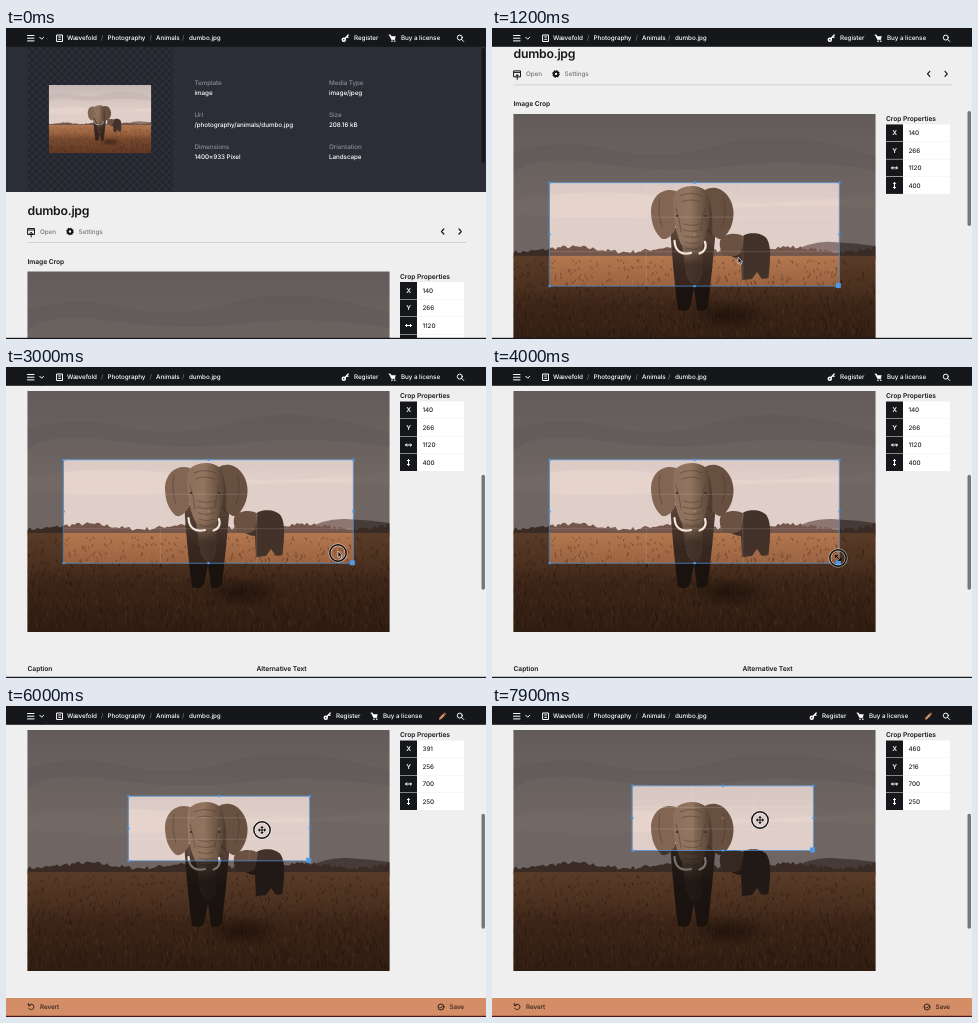
Animation of 480 by 311 pixels, one loop 8000 ms. Source, as an HTML page:

```html
<!DOCTYPE html>
<html lang="en">
<head>
<meta charset="utf-8">
<title>Image crop</title>
<style>
  html, body { margin: 0; width: 100%; height: 100%; overflow: hidden; background: #efefef; }
  svg { display: block; width: 100vw; height: 100vh; }
  text { font: 500 6.3px Inter, Roboto, sans-serif; letter-spacing: -.01em; text-rendering: geometricPrecision; }
  .bold { font-weight: 600; font-size: 6.7px; }
  .line { fill: none; stroke-linecap: round; stroke-linejoin: round; }
</style>
</head>
<body>
<svg id="stage" viewBox="0 0 480 311" xmlns="http://www.w3.org/2000/svg">
  <defs>
    <linearGradient id="sky" x1="0" y1="0" x2="0" y2="1">
      <stop offset="0" stop-color="#c5b8b4"/><stop offset=".6" stop-color="#e0cec8"/>
    </linearGradient>
    <linearGradient id="grass" x1="0" y1="0" x2="0" y2="1">
      <stop offset="0" stop-color="#b37850"/><stop offset=".3" stop-color="#9a6240"/>
      <stop offset=".5" stop-color="#784a2f"/><stop offset="1" stop-color="#5e3823"/>
    </linearGradient>
    <linearGradient id="legs" x1="0" y1="0" x2="0" y2="1">
      <stop offset="0" stop-color="#5d4639"/><stop offset=".5" stop-color="#362720"/><stop offset="1" stop-color="#35241a"/>
    </linearGradient>
    <linearGradient id="skin" x1="0" y1="0" x2="1" y2="0">
      <stop offset="0" stop-color="#8c705d"/><stop offset=".45" stop-color="#92755f"/><stop offset="1" stop-color="#584436"/>
    </linearGradient>
    <linearGradient id="trunk" x1="0" y1="0" x2="0" y2="1">
      <stop offset="0" stop-color="#31231c" stop-opacity="0"/><stop offset=".55" stop-color="#31231c" stop-opacity=".8"/>
    </linearGradient>
    <radialGradient id="shadow">
      <stop offset="0" stop-color="#1c100a" stop-opacity=".55"/><stop offset="1" stop-color="#1c100a" stop-opacity="0"/>
    </radialGradient>
    <pattern id="check" width="7.2" height="7.2" patternUnits="userSpaceOnUse" x="21.5" y="19">
      <path d="M0 0h3.6v7.2h3.6v-3.6H0z" fill="#22252b"/>
    </pattern>
    <clipPath id="frame"><rect x="21.5" y="24" width="362" height="241"/></clipPath>
    <g id="photo" clip-path="url(#frame)">
      <rect x="21" y="24" width="363" height="145" fill="url(#sky)"/>
      <path d="M21 62Q70 48 120 60T230 54 384 66V80Q300 68 240 76T110 74 21 84z" fill="#b3a5a2" opacity=".3"/>
      <path d="M21 110Q100 96 180 108T384 104V118Q280 112 200 122T21 124z" fill="#eadad3" opacity=".4"/>
      <path d="M296 164Q318 151 340 152T384 156V170H296z" fill="#8d7671"/>
      <path id="trees" fill="#74574a"/>
      <rect x="21" y="166" width="363" height="100" fill="url(#grass)"/>
      <path id="blades" class="line" stroke="#3d2113" stroke-width=".8" opacity=".5"/>
      <path id="straw" class="line" stroke="#c98d5f" stroke-width=".6" opacity=".35"/>
      <ellipse cx="236" cy="225" rx="42" ry="16" fill="url(#shadow)"/>
      <path d="M247 149C254 141 270 142 275 149 280 158 278 172 276.500 188L270 189 265 182 260 189 250 190 249 169C243 169 239 165 235 165z" fill="#43322a"/>
      <path d="M228 151C231 143 246 142 252 147L249 163C243 168 236 165 232 166 229 162 227 157 228 151z" fill="#6a5142"/>
      <path d="M178 138L181 175 184 205 186 220Q194 223 198 218L202 198 205 220Q212 223 216 217L220 180 224 138z" fill="url(#legs)"/>
      <path d="M184 101C172 97 160 105 159 120 159 130 161 140 168 147 172 152 178 148 183 140z" fill="#826653"/>
      <path d="M213 100C226 93 240 104 241.500 122 242 135 236 143 231 149 225 151 220 144 215 136z" fill="#685040"/>
      <path d="M214 101Q222 118 220 146L213 140z" fill="#3f2f26" opacity=".6"/>
      <path id="head" d="M182 104C188 95 206 93 214 101 219 110 219 128 215 140L211 156C210 176 211 186 206 193 201 197 195 190 194 180L190 156C184 145 179 122 182 104z" fill="url(#skin)"/>
      <path d="M189 152H212C210 176 211 186 206 193 201 197 195 190 194 180z" fill="url(#trunk)"/>
      <path class="line" d="M192 134q8 3 16 0M191 140q9 3 18 0M192 146q8 3 16 0M193 152q8 3 15 0M194 158q7 3 13 0M188 106q11-5 22 0M190 112q9-4 18 0M168 108q-3 14 2 29M231 108q5 12-1 29M184 118q4 12 5 24M213 118q-3 12-4 22" stroke="#43312a" stroke-width=".8" opacity=".55"/>
      <circle cx="185" cy="126" r="1" fill="#2d201a"/><circle cx="213.500" cy="126" r="1" fill="#2d201a"/>
      <path class="line" d="M182.500 151C183 161 189 165.500 199 163M213 152C215 158 212 162.500 207.500 163.500" stroke="#f1e5d8" stroke-width="2.200"/>
    </g>
  </defs>

  <rect width="480" height="311" fill="#efefef"/>
  <g id="page">
    <rect y="0" width="480" height="164" fill="#2b2e36"/>
    <rect x="21.500" y="19" width="145.500" height="145" fill="url(#check)"/>
    <use href="#photo" transform="translate(42.800 57) scale(.283) translate(-21.500 -24)"/>
    <g id="info"></g>
    <text x="21.500" y="187.400" fill="#16171a" style="font-size:12.3px;font-weight:600;letter-spacing:-.02em">dumbo.jpg</text>
    <g class="line" stroke="#16171a" stroke-width="1">
      <path d="M22 200.500h6.500v6H22zM22 202h6.500M25.200 209v-4.500M23.700 205.700l1.500-1.500 1.500 1.500"/>
      <circle cx="64" cy="203.500" r="2.200" stroke-width="2"/>
      <circle cx="64" cy="203.500" r="3.200" stroke-width="1.200" stroke-dasharray="1.250" stroke-linecap="butt"/>
      <path d="M437.800 201l-2.300 2.500 2.300 2.500M453 201l2.300 2.500-2.300 2.500" stroke-width="1.200"/>
    </g>
    <text x="34" y="205.800" fill="#777">Open</text>
    <text x="72.500" y="205.800" fill="#777">Settings</text>
    <path d="M21.500 214.500H460" stroke="#d2d2d2"/>
    <text class="bold" x="21.500" y="236" fill="#16171a">Image Crop</text>
    <text class="bold" x="394" y="250.700" fill="#16171a">Crop Properties</text>
    <g id="fields"></g>
    <g transform="translate(0 219.500)">
      <use href="#photo"/>
      <path id="shade" fill="#000" fill-opacity=".5" fill-rule="evenodd"/>
      <path id="thirds" class="line" stroke="#eee" stroke-width=".4" stroke-dasharray="1 1" opacity=".4"/>
      <path id="edge" class="line" stroke="#4f98e0" stroke-width=".8" opacity=".9"/>
      <path id="grips" fill="#4f9ae8"/>
    </g>
    <text class="bold" x="21.500" y="523" fill="#16171a">Caption</text>
    <text class="bold" x="250.500" y="523" fill="#16171a">Alternative Text</text>
  </g>

  <rect id="thumb" x="475.500" width="3.500" height="115" rx="1.700" fill="#000" fill-opacity=".5"/>
  <rect width="480" height="18.800" fill="#15171a"/>
  <g class="line" stroke="#fff" stroke-width="1">
    <path d="M21.500 7.500H28M21.500 10.200H28M21.500 12.900H28M33.800 9.300l1.900 1.900 1.900-1.900"/>
    <path d="M51 7h5.500v6.500H51zM52.700 9h2M52.700 11.300h2"/>
    <circle cx="453.800" cy="9.600" r="2.500"/><path d="M455.700 11.500l2 2"/>
  </g>
  <g id="crumbs"></g>
  <g id="menu">
    <circle cx="337.800" cy="11.700" r="1.500" class="line" stroke="#fff" stroke-width="1.500"/>
    <path class="line" d="M339 10.500l3.200-3.500M341 8.300l1 1" stroke="#fff" stroke-width="1.300"/>
    <path d="M383 7h1.500l.5 1.200h4.800l-1 3.200h-3.500z" fill="#fff"/>
    <path class="line" d="M383 7h1.500l1.300 4.700h3" stroke="#fff" stroke-width=".8"/>
    <circle cx="386" cy="13.200" r=".8" fill="#fff"/><circle cx="388.800" cy="13.200" r=".8" fill="#fff"/>
    <text x="348" y="12.400" fill="#fff">Register</text>
    <text x="395" y="12.400" fill="#fff">Buy a license</text>
  </g>
  <path id="pencil" d="M433 13.700l.4-2 4-4.200 1.700 1.700-4.100 4.100zM437.900 7l.7-.6 1.600 1.600-.6.700z" fill="#dc9069"/>

  <g id="bar">
    <rect y="292" width="480" height="19" fill="#d38d67"/>
    <g class="line" stroke="#33231b" stroke-width="1">
      <path d="M22.800 299.300a2.800 2.800 0 1 1-.2 2.800M22.300 297.600v2h2"/>
      <circle cx="435" cy="301" r="3"/><path d="M433.600 301l1.100 1.100 1.900-2"/>
    </g>
    <text x="34" y="303.300" fill="#33231b">Revert</text>
    <text x="443.500" y="303.300" fill="#33231b">Save</text>
  </g>
  <rect id="base" y="309.800" width="480" height="1.200"/>

  <g id="cursor">
    <g id="ring" class="line">
      <circle r="8.200" stroke="#fff" stroke-opacity=".5" stroke-width="3"/>
      <circle r="8.200" stroke="#0c0c0c" stroke-width="1.400"/>
    </g>
    <path id="arrow" d="M0-2V4.500L1.500 3.200 2.500 5.500 3.700 5 2.700 2.800H4.500z" fill="#111" stroke="#fff" stroke-width=".6"/>
    <path id="slant" class="line" d="M-2.500-2.500l5 5M-2.500-.5v-2h2M2.500.5v2h-2" stroke="#111"/>
    <g id="cross" class="line">
      <path d="M-3.200 0H3.200M0-3.200V3.200" stroke="#fff" stroke-width="2.400" opacity=".8"/>
      <path d="M-3 0H3M0-3V3M-2.500-.8L-3.400 0l.9.800M2.500-.8L3.400 0l-.9.800M-.8-2.500L0-3.400l.8.900M-.8 2.500L0 3.400l.8-.9" stroke="#111" stroke-width="1.100"/>
    </g>
  </g>
</svg>
<script>
const $ = id => document.getElementById(id);
const LOOP = 8000, STEP = 100;
const LEFT = 21.5, TOP = 24, W = 362, H = 241, UNIT = W / 1400;

const label = (x, y, s, fill, extra = '') => `<text x="${x}" y="${y}" fill="${fill}" ${extra}>${s}</text>`;
const show = (id, on) => $(id).setAttribute('display', on ? 'inline' : 'none');
const move = (id, x, y) => $(id).setAttribute('transform', `translate(${x} ${y})`);

// Static labels
$('crumbs').innerHTML = [[61, 'Wævefold'], [101.5, 'Photography'], [150, 'Animals'], [183, 'dumbo.jpg']]
  .map(([x, s]) => label(x, 12.4, s, '#fff')).join('') +
  [95, 143.5, 176].map(x => label(x, 12.4, '/', '#777')).join('');

$('info').innerHTML = [
  [188.5, 54.5, 'Template', 'image'], [323, 54.5, 'Media Type', 'image/jpeg'],
  [188.5, 86.5, 'Url', '/photography/animals/dumbo.jpg'], [323, 86.5, 'Size', '208.16 kB'],
  [188.5, 118.5, 'Dimensions', '1400×933 Pixel'], [323, 118.5, 'Orientation', 'Landscape']
].map(([x, y, k, v]) => label(x, y + 2, k, '#8b8e95') + label(x, y + 12.7, v, '#fff')).join('');

const letter = s => label(402.5, 0, s, '#fff', 'class="bold" text-anchor="middle"');
const signs = [letter('X'), letter('Y'), '', 'rotate(90)'];
$('fields').innerHTML = signs.map((sign, i) => {
  const y = 254 + i * 17.5;
  const icon = i < 2
    ? `<g transform="translate(0 ${y + 10.8})">${sign}</g>`
    : `<path class="line" transform="translate(402.5 ${y + 8.5}) ${sign}" d="M-3 0H3M-1.800-1.200L-3 0l1.200 1.200M1.800-1.200L3 0 1.800 1.200" stroke="#fff"/>`;
  return `<rect x="394" y="${y}" width="64" height="17" fill="#fff"/>
    <rect x="394" y="${y}" width="17" height="17" fill="#15171a"/>${icon}
    <text id="val${i}" x="416.500" y="${y + 10.8}" fill="#222"></text>`;
}).join('');

// Trees and grass
let seed = 7;
const rnd = () => (seed = seed * 16807 % 2147483647) / 2147483647;
let trees = 'M21 168';
for (let x = 21; x < 386; x += 2.5) trees += `L${x} ${(161.5 + 2.5 * Math.sin(x / 17) - rnd() * 4).toFixed(1)}`;
$('trees').setAttribute('d', trees + 'V168z');
const tufts = n => {
  let d = '';
  while (n--) {
    const depth = rnd();
    d += `M${(21 + rnd() * 363).toFixed(1)} ${(171 + depth * 93).toFixed(1)}l${(rnd() * 3 - 1.5).toFixed(1)} ${(-1.5 - depth * 4).toFixed(1)}`;
  }
  return d;
};
$('blades').setAttribute('d', tufts(800));
$('straw').setAttribute('d', tufts(600));

// Monotone cubic through [time, value] points
function track(t, pts) {
  const n = pts.length - 1;
  if (t <= pts[0][0]) return pts[0][1];
  if (t >= pts[n][0]) return pts[n][1];
  const slope = i => i < 0 || i >= n ? 0 : (pts[i + 1][1] - pts[i][1]) / (pts[i + 1][0] - pts[i][0]);
  const tangent = i => {
    const a = slope(i - 1), b = slope(i);
    return a * b <= 0 ? 0 : 2 * a * b / (a + b);
  };
  let i = 0;
  while (t > pts[i + 1][0]) i++;
  const [t0, a] = pts[i], [t1, b] = pts[i + 1], d = t1 - t0, u = (t - t0) / d, v = 1 - u;
  return a * v * v * (1 + 2 * u) + b * u * u * (3 - 2 * u) + d * u * v * (tangent(i) * v - tangent(i + 1) * u);
}

const scrollPath = [[500, 0], [1000, 86], [1300, 188], [1500, 217], [1900, 219.5]];
const widthPath = [[4100, 1120], [4400, 900], [4700, 703], [4800, 700]];
const cropX = [[5300, 140], [5700, 310], [6000, 391], [6700, 440], [6800, 440], [7500, 457], [7900, 460]];
const cropY = [[5300, 266], [6000, 256], [6700, 228], [6800, 228], [7500, 218], [7900, 216]];
const mouseX = [[2200, 246], [3000, 332], [3300, 334], [3900, 346], [4100, 346], [4700, 240], [4800, 239], [5200, 190],
  [5300, 190], [5700, 234], [6000, 256], [6700, 264], [6800, 264], [7900, 268]];
const mouseY = [[2200, 231], [3000, 186], [3300, 187], [3900, 191], [4100, 191], [4700, 140], [4800, 140], [5200, 127],
  [5300, 127], [6000, 124], [6700, 117], [6800, 117], [7900, 114]];

const box = (x, y, w, h) => `M${x} ${y}h${w}v${h}h${-w}z`;

function drawCrop(cx, cy, cw, ch) {
  const x = LEFT + cx * UNIT, y = TOP + cy * UNIT, w = cw * UNIT, h = ch * UNIT;
  const mx = x + w / 2, my = y + h / 2;
  $('shade').setAttribute('d', box(LEFT, TOP, W, H) + box(x, y, w, h));
  $('edge').setAttribute('d', box(x, y, w, h));
  $('thirds').setAttribute('d', [1, 2].map(k =>
    `M${x + w * k / 3} ${y}v${h}M${x} ${y + h * k / 3}h${w}`).join('') + `M${mx - 1.5} ${my}h3M${mx} ${my - 1.5}v3`);
  const dots = [[x, y], [mx, y], [x + w, y], [x, my], [x + w, my], [x, y + h], [mx, y + h]];
  $('grips').setAttribute('d', dots.map(([a, b]) => box(a - 1.1, b - 1.1, 2.2, 2.2)).join('') +
    box(x + w - 3.5, y + h - 3, 5, 5));
}

function draw(t) {
  const scroll = track(t, scrollPath);
  move('page', 0, -scroll);
  $('thumb').setAttribute('y', 20 + scroll * .4);

  const w = Math.round(track(t, widthPath));
  const crop = [Math.round(track(t, cropX)), Math.round(track(t, cropY)), w, Math.round(w / 2.8)];
  drawCrop(...crop);
  crop.forEach((v, i) => $('val' + i).textContent = v);

  const dirty = t >= 5100;
  move('menu', dirty ? -18 : 0, 0);
  show('pencil', dirty);
  move('bar', 0, track(t, [[5000, 19], [5300, 0]]));
  show('bar', dirty);
  $('base').setAttribute('fill', dirty ? '#4c1512' : '#15171a');

  move('cursor', track(t, mouseX), track(t, mouseY));
  show('cursor', t >= 400);
  show('ring', t >= 2500);
  show('arrow', t < 3700);
  show('slant', t >= 3700 && t < 4500);
  show('cross', t >= 4500);
}

function tick() {
  draw(Math.floor(performance.now() % LOOP / STEP) * STEP);
  requestAnimationFrame(tick);
}
tick();
</script>
</body>
</html>
```
